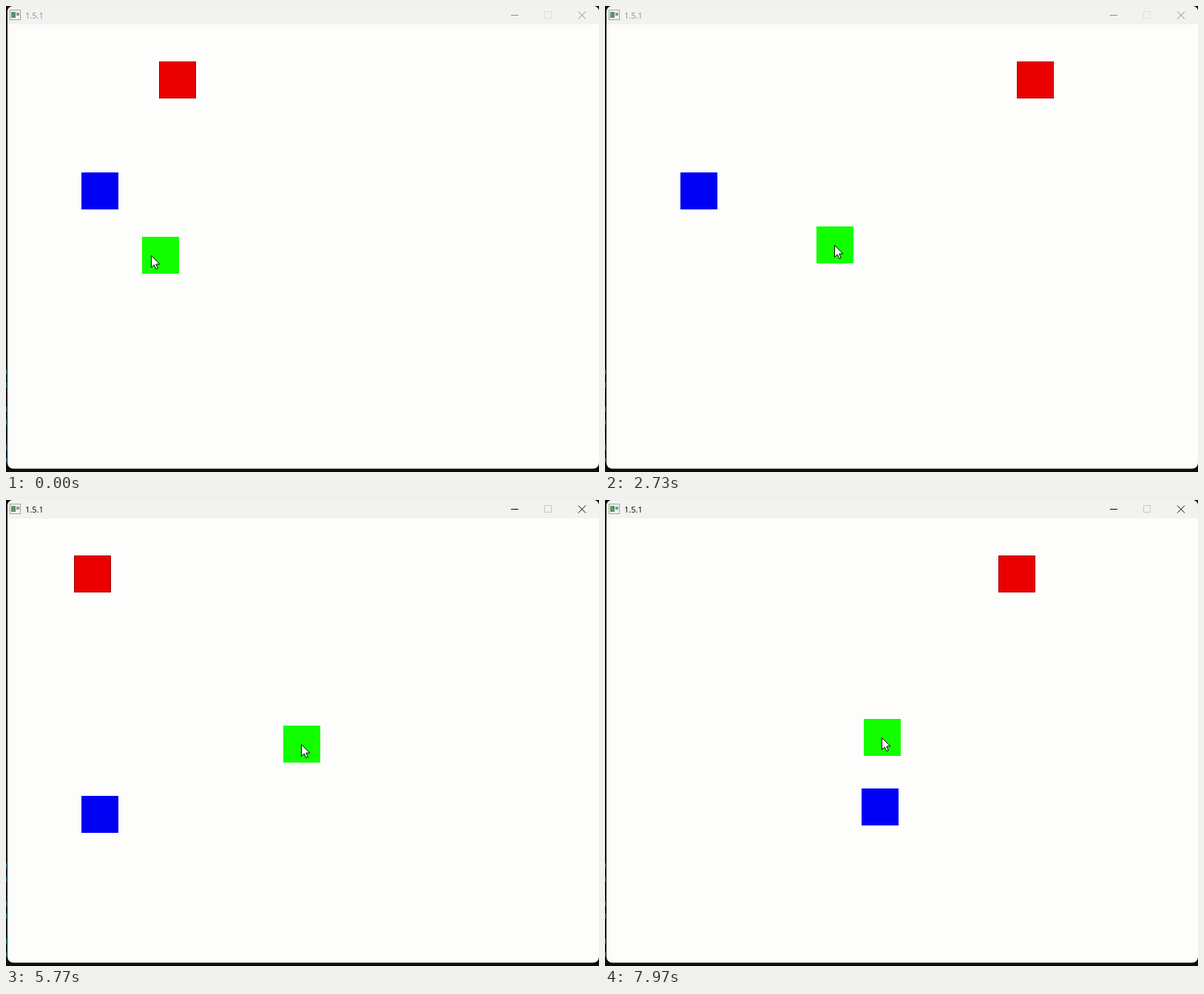
Write an HTML page that moves like this. It is 802 px wide and 630 px high and loops after 8000 ms.

```html
<!DOCTYPE html>
<html lang="en">
<head>
<meta charset="utf-8">
<title>1.5.1</title>
<style>
  html, body { margin: 0; width: 100%; height: 100%; overflow: hidden; background: #0d0c0a; }
  svg { display: block; width: 100%; height: 100%; }
  text { font: 11px "Open Sans", "Noto Sans", sans-serif; }
  .active { --ink: #000; --dim: #c6c6c4; }
  .idle { --ink: #8c8c8a; --dim: #dededc; }
  .ink { stroke: var(--ink); fill: none; }
</style>
</head>
<body>
<svg viewBox="0 0 802 630">
  <defs>
    <clipPath id="frame"><rect x="2" width="800" height="625.5" rx="8"/></clipPath>
  </defs>
  <rect width="802" height="630" fill="#0d0c0a"/>
  <path d="M.5 491v7M.5 509v7M.5 542v7M.5 559v7M.5 593v7M.5 611v6" stroke="#2f7f8c"/>
  <g clip-path="url(#frame)">
    <rect width="802" height="630" fill="#fdfdfc"/>
    <rect width="802" height="25" fill="#f2f2f0"/>
    <g id="bar" class="idle">
      <rect x="5.5" y="5.5" width="14" height="13" fill="#f4f4f0" stroke="#a3a39c"/>
      <rect x="7" y="8" width="6" height="8" fill="#5c9468"/>
      <rect x="14" y="9" width="4" height="4" fill="#7f9c9c"/>
      <text x="26" y="16.5" fill="var(--ink)">1.5.1</text>
      <path class="ink" d="M683 12.5h10M774 7.5l10 10M784 7.5l-10 10"/>
      <rect x="728.5" y="7.5" width="9" height="9" fill="none" stroke="var(--dim)"/>
    </g>
    <rect id="red" x=".5" y=".5" width="49" height="49" fill="#ea0000" stroke="#a40000"/>
    <rect id="blue" width="50" height="50" fill="#0000f2"/>
    <rect id="green" width="50" height="50" fill="#12ff00"/>
    <path id="cursor" d="M.5 .5V16.5L4.3 13L6.9 18.6L9.3 17.5L6.8 12H11.8Z" fill="#fff" stroke="#000"/>
  </g>
</svg>
<script>
const LOOP = 8000, STEP = 100 / 3;
const GRID = 5, SPAN = 750, SPEED = 0.2813;   // red square: px, px, px/ms
const REPEAT = 30, LAG = 35, ACTIVATE = 3050; // ms

// Held arrow keys: start, direction, number of repeats
const presses = [
  { at: 3600, dx: -1, dy: 0, n: 1 },
  { at: 4095, dx: 0, dy: 1, n: 35 },
  { at: 5760, dx: 1, dy: 0, n: 50 },
  { at: 7920, dx: 0, dy: -1, n: 2 },
];

// Eased pointer strokes from its first position
const origin = { x: 253, y: 337 };
const strokes = [
  { at: -250, ms: 500, dx: -114, dy: 0 },
  { at: 450, ms: 600, dx: 221, dy: -7 },
  { at: 1250, ms: 350, dx: -50, dy: -7 },
  { at: 4500, ms: 800, dx: 89, dy: 7 },
  { at: 5900, ms: 400, dx: -15, dy: -3 },
  { at: 6400, ms: 200, dx: 10, dy: 0 },
  { at: 6700, ms: 500, dx: -20, dy: -6 },
];

const $ = id => document.getElementById(id);
const clamp = (v, lo, hi) => Math.min(hi, Math.max(lo, v));
const smooth = f => f * f * (3 - 2 * f);
const place = (id, x, y) => $(id).setAttribute("transform", `translate(${x} ${y})`);

// Sum of all moves, each weighted by how much of it is done
function travel(from, moves, done) {
  return moves.reduce((p, m) => {
    const k = done(m);
    return { x: p.x + m.dx * k, y: p.y + m.dy * k };
  }, from);
}

function pointer(t) {
  const p = travel(origin, strokes, m => smooth(clamp((t - m.at) / m.ms, 0, 1)));
  return { x: Math.round(p.x), y: Math.round(p.y) };
}

// Constant speed, folded between the two walls
function redX(t) {
  const run = -205 + SPEED * Math.max(0, t - STEP);
  const d = Math.abs(Math.round(run / GRID) * GRID) % (2 * SPAN);
  return 2 + Math.min(d, 2 * SPAN - d);
}

function draw(ms) {
  const tick = Math.floor((ms % LOOP + 3.4) / STEP);
  const t = Math.round(tick * STEP / 10) * 10;

  place("red", redX(t), 75);

  const b = travel({ x: 0, y: 0 }, presses,
    m => clamp(Math.floor((t - m.at) / REPEAT) + 1, 0, m.n));
  place("blue", 102 + b.x * GRID, 225 + b.y * GRID);

  const tip = pointer(t), late = pointer(t - LAG);
  place("green", late.x - 24, late.y - 25);
  place("cursor", tip.x, tip.y);

  $("bar").setAttribute("class", t < ACTIVATE ? "idle" : "active");
}

let start;
function loop(now) {
  start ??= now;
  draw(now - start);
  requestAnimationFrame(loop);
}
draw(0);
requestAnimationFrame(loop);
</script>
</body>
</html>
```
